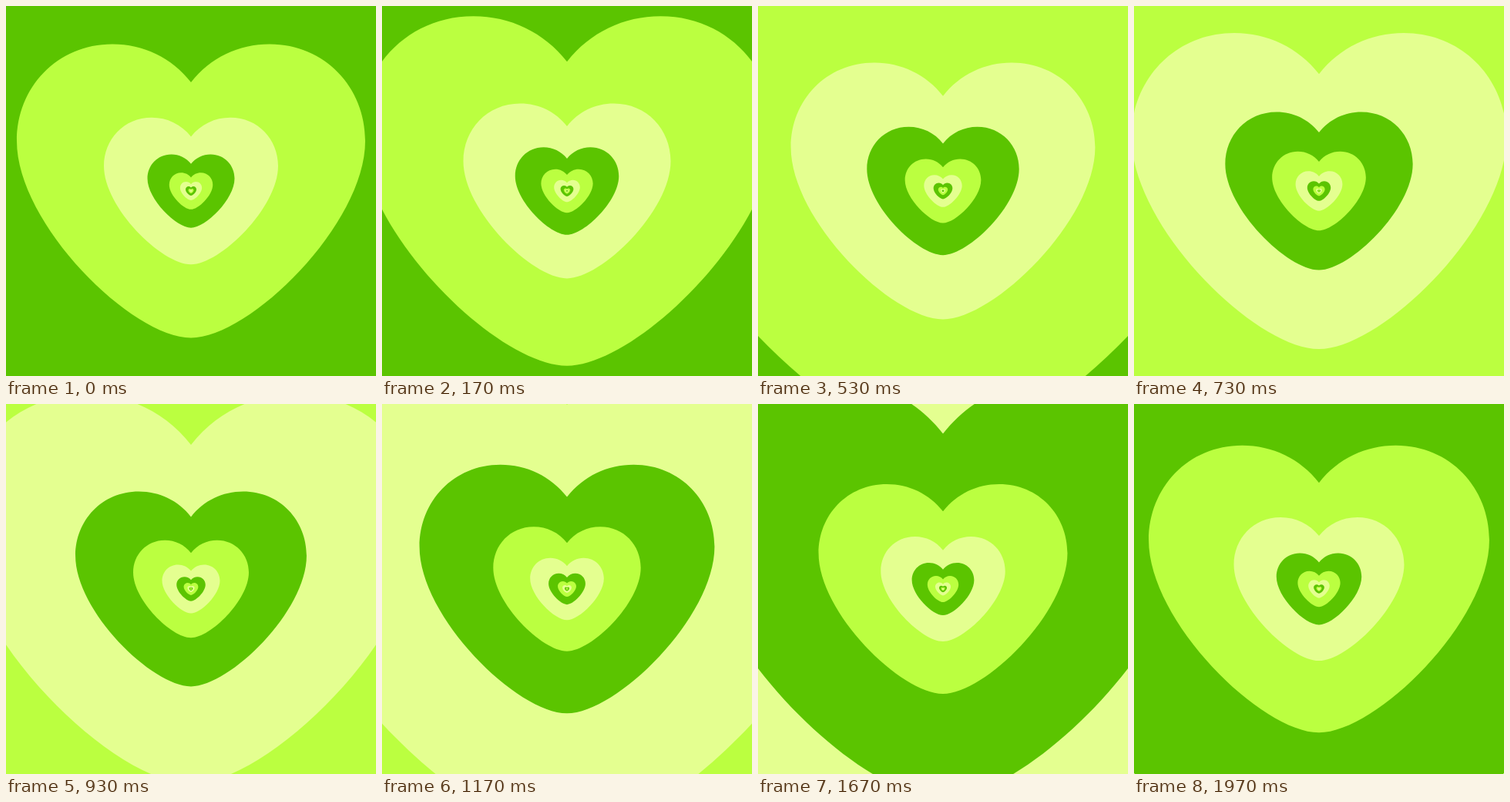
An HTML page with a canvas that plays this animation: 480x480 px, repeating every 2010 ms.

```html
<!DOCTYPE html>
<html lang="en">
<head>
<meta charset="utf-8">
<title>Nested hearts</title>
<style>
  html, body { margin: 0; width: 100%; height: 100%; overflow: hidden; background: #5bc400; }
  canvas { display: block; }
</style>
</head>
<body>
<canvas id="stage" width="480" height="480"></canvas>
<script>
const ctx = document.getElementById('stage').getContext('2d');
const DARK = '#5bc400', LIME = '#bbff40', CREAM = '#e4ff90';
const COLORS = [LIME, CREAM, DARK];
const LOOP = 2010, LAST_STEP = 59, STEPS_PER_CYCLE = 59.65;

const heart = new Path2D(`M0-141
  C-25-173-62-190.5-102-190.5 C-174-190.5-226-134-226-65
  C-226 43-76 190.5 0 190.5 C76 190.5 226 43 226-65
  C226-134 174-190.5 102-190.5 C62-190.5 25-173 0-141Z`);

// 30 steps per second, each starting on a 10 ms tick
function stepAt(ms) {
  const tick = Math.floor((ms % LOOP) / 10) * 10;
  return Math.min(LAST_STEP, Math.floor((tick + 5) * 0.03));
}

function draw(now) {
  // every heart doubles in size three times per cycle
  const doublings = 3 * stepAt(now) / STEPS_PER_CYCLE;
  ctx.setTransform(1, 0, 0, 1, 0, 0);
  ctx.fillStyle = DARK;
  ctx.fillRect(0, 0, 480, 480);
  for (let i = 0; i < doublings + 8; i++) {
    const scale = 2 ** (doublings - i);
    ctx.setTransform(scale, 0, 0, scale, 240, 240);
    ctx.fillStyle = COLORS[i % 3];
    ctx.fill(heart);
  }
}

const start = performance.now();
function loop() {
  draw(performance.now() - start);
  requestAnimationFrame(loop);
}
loop();
</script>
</body>
</html>
```
